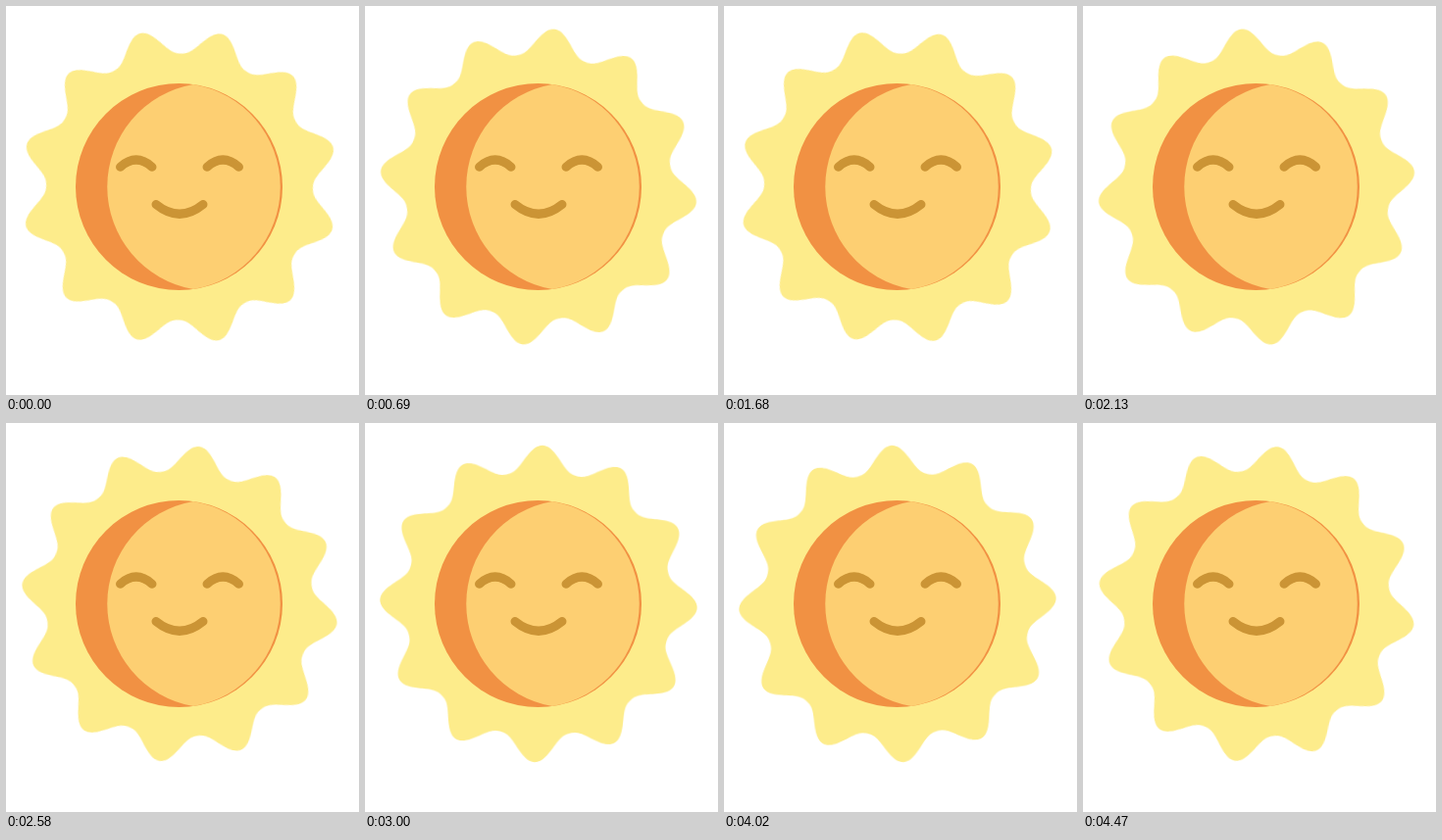
An HTML page that plays this animation: 360x397 px, repeating every 4500 ms.

```html
<!DOCTYPE html>
<html lang="en">
<head>
<meta charset="utf-8">
<title>Smiling sun</title>
<style>
  html, body { margin: 0; width: 100%; height: 100%; overflow: hidden; background: #fff; }
  svg { display: block; width: 360px; height: 397px; }
  #rays {
    fill: #fdec8b;
    transform-origin: 177px 184.5px;
    animation: sway 4500ms infinite;
  }
  .line { fill: none; stroke: #cb9435; stroke-width: 9; stroke-linecap: round; }

  /* 900 ms per swing; the loop cuts back after the third swing to the right */
  @keyframes sway {
    0%, 39.33%, 79.33% {
      transform: rotate(-14.4deg);
      animation-timing-function: cubic-bezier(.36, .08, .56, .94);
    }
    19.33%, 59.33% {
      transform: rotate(7.8deg);
      animation-timing-function: cubic-bezier(.445, .05, .55, .95);
    }
    99.33%, 100% { transform: rotate(7.8deg); }
  }
</style>
</head>
<body>
<svg viewBox="0 0 360 397">
  <path id="rays"/>
  <circle cx="176.5" cy="184.5" r="105.5" fill="#f19143"/>
  <path d="M191 80A105.9 105.9 0 0 1 191 289A106.1 106.1 0 0 1 191 80Z" fill="#fdcf72"/>
  <g class="line">
    <path d="M116.5 164.3Q132.7 149.8 149 164.3"/>
    <path d="M205 164.3Q221.2 149.8 237.5 164.3"/>
    <path d="M153 202.5Q177 222 201 202.5"/>
  </g>
</svg>
<script>
  const CX = 177, CY = 184.5, RAYS = 12, INNER = 136, OUTER = 161.7;

  // Wavy outline with one ray pointing straight up
  function rayPath(steps = 720) {
    const points = [];
    for (let i = 0; i < steps; i++) {
      const a = i / steps * 2 * Math.PI;
      const wave = Math.pow((1 + Math.cos(RAYS * a)) / 2, 1.25);
      const r = INNER + (OUTER - INNER) * wave;
      points.push((CX + r * Math.sin(a)).toFixed(2) + ' ' + (CY - r * Math.cos(a)).toFixed(2));
    }
    return 'M' + points.join('L') + 'Z';
  }

  document.getElementById('rays').setAttribute('d', rayPath());
</script>
</body>
</html>
```
